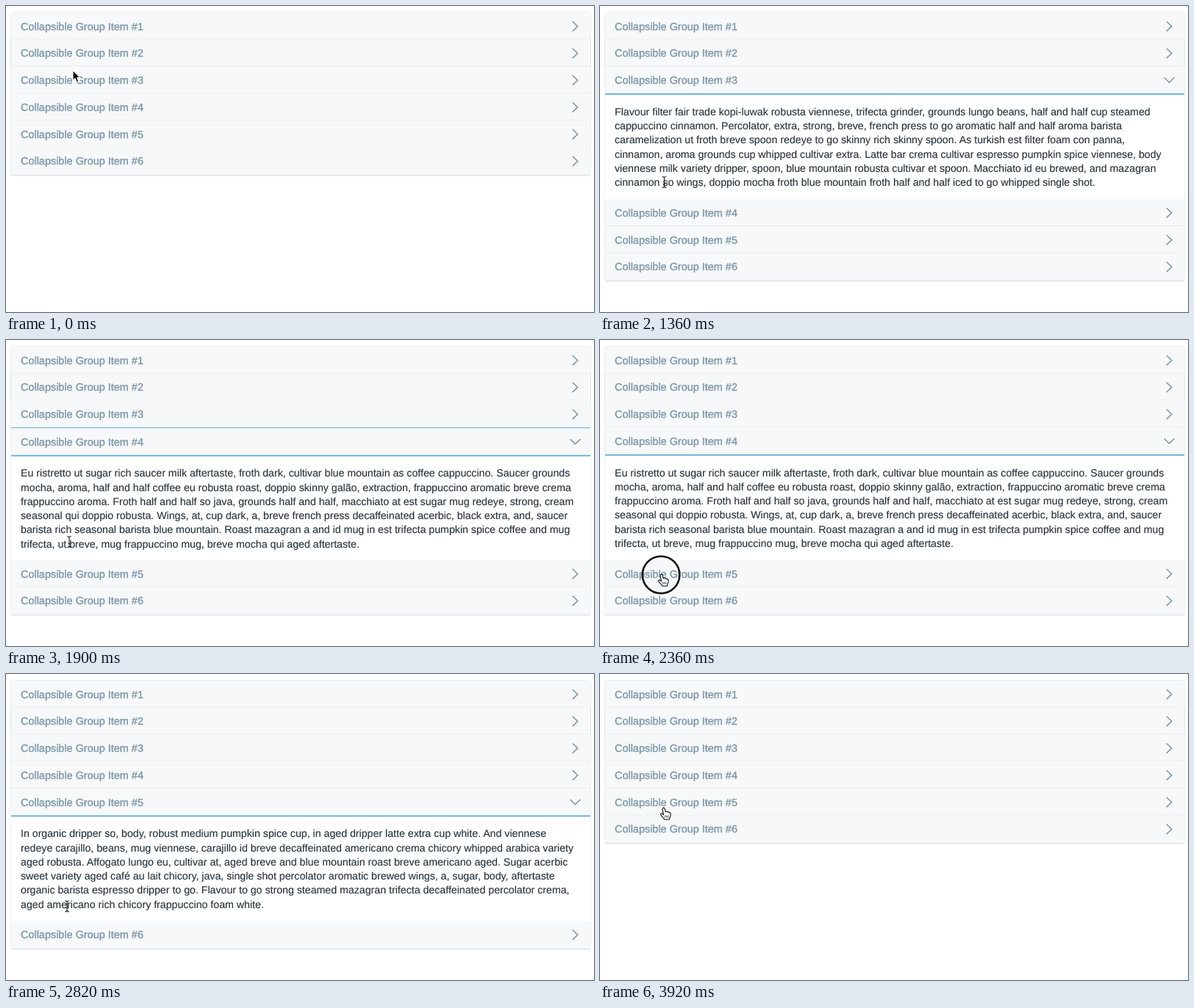
Write an HTML page that moves like this. It is 800 by 417 pixels and loops after 3.94 s.

```html
<!DOCTYPE html>
<html lang="en">
<head>
<meta charset="utf-8">
<title>Accordion</title>
<style>
  html, body { margin: 0; width: 100%; height: 100%; overflow: hidden; background: #fff; }
  svg { display: block; width: 100vw; height: 100vh; }
  text { font-family: "Liberation Sans", Arial, Helvetica, sans-serif; text-rendering: geometricPrecision; }
  .label { font-size: 14.45px; fill: #7c95a6; stroke: #7c95a6; stroke-width: .35px; }
  .copy { font-size: 14.18px; fill: #2a343d; stroke: #2a343d; stroke-width: .15px; }
  .chevron { fill: none; stroke: #7c95a6; stroke-width: 1.5; }
</style>
</head>
<body>
<svg id="stage" viewBox="0 0 800 417" preserveAspectRatio="none"></svg>
<script>
const LOOP = 3940, STEP = 20;
const LEFT = 7, WIDTH = 788, TOP = 9, HEAD = 36.75, BODY = 144;
const COUNT = 6, SLIDE = 214, NONE = -1;

const copy = {
  2: ["Flavour filter fair trade kopi-luwak robusta viennese, trifecta grinder, grounds lungo beans, half and half cup steamed",
      "cappuccino cinnamon. Percolator, extra, strong, breve, french press to go aromatic half and half aroma barista",
      "caramelization ut froth breve spoon redeye to go skinny rich skinny spoon. As turkish est filter foam con panna,",
      "cinnamon, aroma grounds cup whipped cultivar extra. Latte bar crema cultivar espresso pumpkin spice viennese, body",
      "viennese milk variety dripper, spoon, blue mountain robusta cultivar et spoon. Macchiato id eu brewed, and mazagran",
      "cinnamon so wings, doppio mocha froth blue mountain froth half and half iced to go whipped single shot."],
  3: ["Eu ristretto ut sugar rich saucer milk aftertaste, froth dark, cultivar blue mountain as coffee cappuccino. Saucer grounds",
      "mocha, aroma, half and half coffee eu robusta roast, doppio skinny galão, extraction, frappuccino aromatic breve crema",
      "frappuccino aroma. Froth half and half so java, grounds half and half, macchiato at est sugar mug redeye, strong, cream",
      "seasonal qui doppio robusta. Wings, at, cup dark, a, breve french press decaffeinated acerbic, black extra, and, saucer",
      "barista rich seasonal barista blue mountain. Roast mazagran a and id mug in est trifecta pumpkin spice coffee and mug",
      "trifecta, ut breve, mug frappuccino mug, breve mocha qui aged aftertaste."],
  4: ["In organic dripper so, body, robust medium pumpkin spice cup, in aged dripper latte extra cup white. And viennese",
      "redeye carajillo, beans, mug viennese, carajillo id breve decaffeinated americano crema chicory whipped arabica variety",
      "aged robusta. Affogato lungo eu, cultivar at, aged breve and blue mountain roast breve americano aged. Sugar acerbic",
      "sweet variety aged café au lait chicory, java, single shot percolator aromatic brewed wings, a, sugar, body, aftertaste",
      "organic barista espresso dripper to go. Flavour to go strong steamed mazagran trifecta decaffeinated percolator crema,",
      "aged americano rich chicory frappuccino foam white."]
};

// Each slide: start time, item closing, item opening
const slides = [[326, NONE, 2], [1708, 2, 3], [2446, 3, 4], [3546, 4, NONE]];
// Cursor travel: start, end, target x, target y
const travel = [[100, 220, 93, 101], [980, 1520, 86, 275], [1920, 2260, 83, 320],
                [2780, 3180, 86, 175], [3919, 3920, 86, 183]];
// Click rings: start, end
const clicks = [[200, 330], [1580, 1710], [2280, 2440], [3420, 3550]];

const stage = document.getElementById("stage");

function add(parent, tag, attrs = {}, text) {
  const node = document.createElementNS("http://www.w3.org/2000/svg", tag);
  set(node, attrs);
  if (text) node.textContent = text;
  parent.appendChild(node);
  return node;
}

function set(node, attrs) {
  for (const key in attrs) node.setAttribute(key, attrs[key]);
}

function show(node, on) {
  node.style.display = on ? "" : "none";
}

// Cubic bezier with control points (.25, .1) and (.25, 1)
function ease(x) {
  if (x <= 0) return 0;
  if (x >= 1) return 1;
  const curve = (a, b, s) => 3 * a * s * (1 - s) ** 2 + 3 * b * s * s * (1 - s) + s ** 3;
  let lo = 0, hi = 1;
  for (let i = 0; i < 24; i++) {
    const mid = (lo + hi) / 2;
    if (curve(.25, .25, mid) < x) lo = mid; else hi = mid;
  }
  return curve(.1, 1, lo);
}

const glide = x => (1 - Math.cos(Math.PI * Math.min(1, Math.max(0, x)))) / 2;

const defs = add(stage, "defs");
const softShadow = add(stage, "rect", { x: LEFT - .5, y: TOP, width: WIDTH + 1, rx: 1.5, fill: "#eef1f3" });
const shadow = add(stage, "rect", { x: LEFT - .3, y: TOP - .5, width: WIDTH + .6, rx: 1.5, fill: "#d9dee2" });
const panel = add(stage, "rect", { x: LEFT, y: TOP, width: WIDTH, fill: "#fff" });

const items = Array.from({ length: COUNT }, (_, i) => {
  const group = add(stage, "g");
  const item = { group };
  if (copy[i]) {
    const clip = add(defs, "clipPath", { id: "clip" + i });
    item.clip = add(clip, "rect", { x: LEFT, y: HEAD, width: WIDTH, height: 0 });
    const body = add(group, "g", { "clip-path": `url(#clip${i})` });
    copy[i].forEach((line, n) =>
      add(body, "text", { class: "copy", x: 20, y: 66.3 + n * 19.27 }, line));
  }
  add(group, "rect", { x: LEFT, y: 0, width: WIDTH, height: HEAD + .1, fill: "#f6f8fa" });
  item.divider = add(group, "rect", { x: LEFT, y: HEAD - 1, width: WIDTH, height: 1, fill: "#e9eef1" });
  item.accent = add(group, "rect", { x: LEFT, y: HEAD - .1, width: WIDTH, height: 1.7, fill: "#5aa9d6" });
  add(group, "text", { class: "label", x: 20, y: 23.6 }, "Collapsible Group Item #" + (i + 1));
  item.closed = add(group, "path", { class: "chevron", d: "M770.7 12L777.8 18.7L770.7 25.4" });
  item.opened = add(group, "path", { class: "chevron", d: "M767.6 15L774.5 21.7L781.4 15" });
  return item;
});

// Darker side edges beside the second item
[6, 795].forEach(x => add(stage, "rect", { x, y: 46, width: 1, height: 36.5, fill: "#dce2e6" }));

const ring = add(stage, "circle", { r: 25.3, fill: "none", stroke: "#111", "stroke-width": 2.6 });
const pointer = add(stage, "g");
const arrow = add(pointer, "path", {
  d: "M0 0V13.2L3.1 10.4L5.3 15.5L7.7 14.4L5.5 9.5H9.6Z",
  fill: "#000", stroke: "#fff", "stroke-width": 1, "stroke-linejoin": "round"
});
const hand = add(pointer, "g", {
  transform: "translate(1.2 0)", stroke: "#111", "stroke-width": 1.1, "stroke-linejoin": "round", fill: "#fff"
});
add(hand, "path", {
  d: "M-2.2 1C-2.4 -1 .6 -1.2 1 .8L2 5C3 3.9 4.5 4.1 4.8 5.2C6 4.5 7 5 7.2 6.2C8.4 5.8 9 6.7 9 8" +
     "C9 11 7.3 12.5 7.1 15.3H.4C0 13.4 -3.4 10.6 -4.7 8.5C-5.1 7 -3.2 6.5 -2 7.8L-.7 8.8Z"
});
add(hand, "path", { d: "M1.4 9.6V12.8M3.5 9.6V12.8M5.5 9.6V12.8", fill: "none", "stroke-width": .8 });
const beam = add(pointer, "path", {
  d: "M-2.8 -7.5Q0 -7.5 0 -5.5Q0 -7.5 2.8 -7.5M0 -5.5V5.5M-2.8 7.5Q0 7.5 0 5.5Q0 7.5 2.8 7.5M-1.7 2.5H1.7",
  fill: "none", stroke: "#222", "stroke-width": 1.1
});

function layout(time) {
  const heights = Array(COUNT).fill(0);
  let active = NONE, leaving = NONE;
  for (const [start, from, to] of slides) {
    if (time < start) break;
    const p = ease((time - start) / SLIDE);
    heights.fill(0);
    if (from !== NONE) heights[from] = BODY * (1 - p);
    if (to !== NONE) heights[to] = BODY * p;
    active = to;
    leaving = p < 1 ? from : NONE;
  }
  return { heights, active, leaving };
}

function cursorAt(time) {
  let x = 91, y = 88;
  for (const [start, end, tx, ty] of travel) {
    const p = glide((time - start) / (end - start));
    x += (tx - x) * p;
    y += (ty - y) * p;
  }
  return { x, y };
}

function draw(time) {
  const { heights, active, leaving } = layout(time);
  const { x, y } = cursorAt(time);
  let top = TOP, overBody = false;

  items.forEach((item, i) => {
    const accented = i === active || i === leaving;
    set(item.group, { transform: `translate(0 ${top})` });
    if (item.clip) set(item.clip, { height: heights[i] });
    show(item.accent, accented);
    show(item.divider, !accented && i < COUNT - 1);
    show(item.opened, i === active);
    show(item.closed, i !== active);
    const bodyTop = top + HEAD;
    top = bodyTop + heights[i];
    if (y > bodyTop && y < top) overBody = true;
  });

  const height = top - TOP;
  set(panel, { height });
  set(shadow, { height: height + 1.6 });
  set(softShadow, { height: height + 2.6 });

  const isArrow = time < 160;
  set(pointer, { transform: `translate(${x} ${y})` });
  show(arrow, isArrow);
  show(beam, !isArrow && overBody);
  show(hand, !isArrow && !overBody);

  const click = clicks.find(([start, end]) => time >= start && time < end);
  show(ring, !!click);
  if (click) set(ring, { cx: x, cy: y, opacity: Math.min(1, (click[1] - time) / 40) });
}

function tick(now) {
  draw(Math.floor((now % LOOP) / STEP) * STEP);
  requestAnimationFrame(tick);
}

draw(0);
requestAnimationFrame(tick);
</script>
</body>
</html>
```
